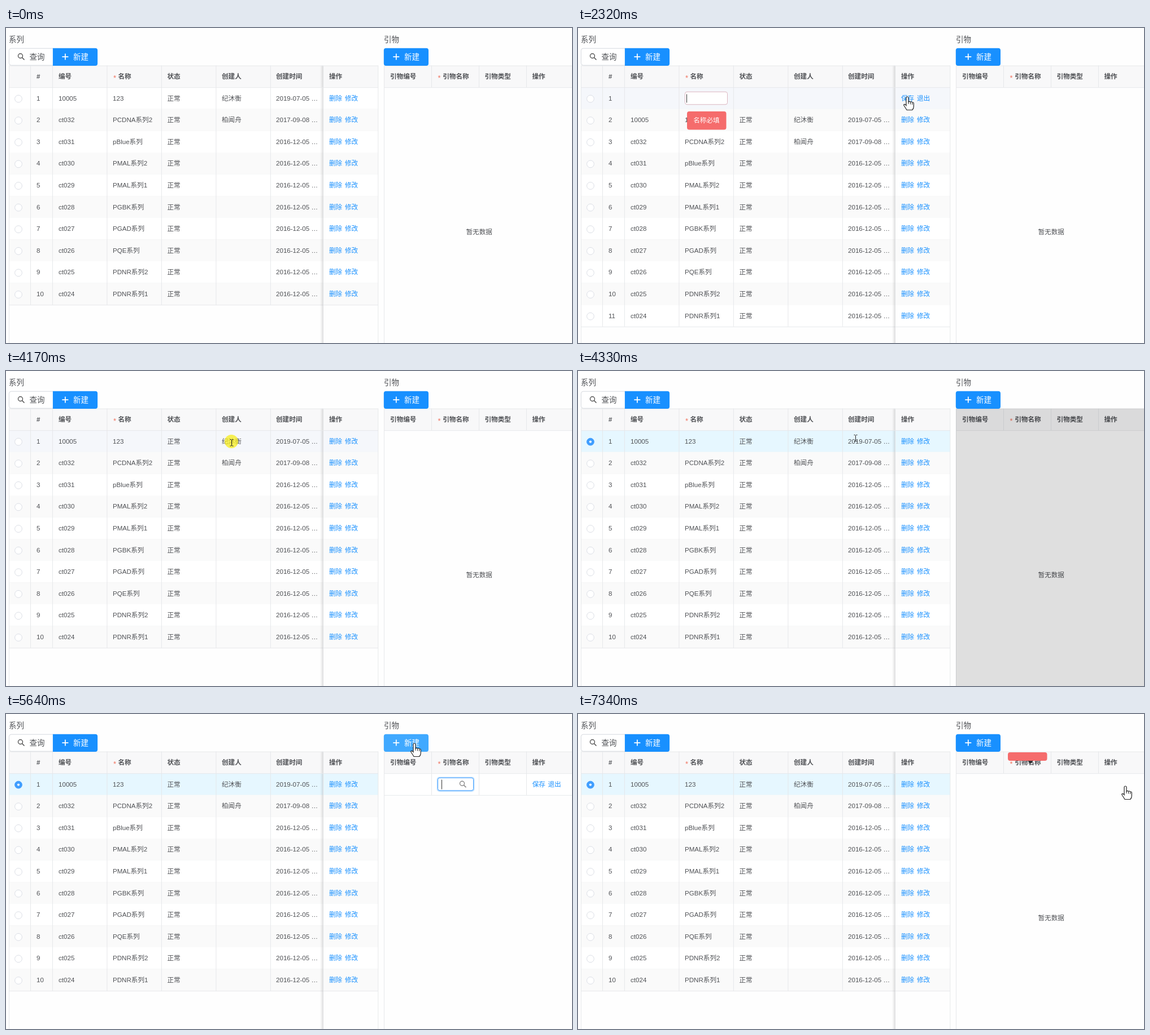
An HTML page that plays this animation: 1002 px wide and 559 px high, repeating every 8000 ms.

```html
<!DOCTYPE html>
<html lang="zh-CN">
<head>
<meta charset="utf-8">
<style>
html, body { margin: 0; width: 100%; height: 100%; overflow: hidden; background: #fefefe; }
svg { display: block; width: 1002px; height: 559px; }
text {
  font: 11.58px "Liberation Sans", "Noto Sans CJK SC", "Noto Sans CJK", sans-serif;
  fill: #505256; white-space: pre;
}
.big { font-size: 13.5px; }
.bold { font-weight: bold; }
.btn { font-weight: 500; fill: #fff; }
.link { fill: #1890ff; }
.star { fill: #f0705c; font-size: 13px; }
.tip { fill: #fff; }
</style>
</head>
<body>
<svg id="stage" viewBox="0 0 1002 559"></svg>
<script>
const LOOP = 8000, STEP = 77.4, ROW = 38.6, HEAD = 66.6, TOP = HEAD + ROW, THIN = .965;
const LINE = '#e6e8ea', BLUE = '#1890ff', RED = '#f56c6c';
const stage = document.getElementById('stage');

// id, name, creator, date
const DATA = [
  ['10005', '123', '纪沐衡', '2019-07-05'],
  ['ct032', 'PCDNA系列2', '柏闻舟', '2017-09-08'],
  ...['pBlue系列', 'PMAL系列2', 'PMAL系列1', 'PGBK系列', 'PGAD系列', 'PQE系列', 'PDNR系列2', 'PDNR系列1']
    .map((name, i) => ['ct0' + (31 - i), name, '', '2016-12-05'])
];

// moments of the story
const ADD_L = 843, FAIL_L = 2230, EXIT_L = 3390, PICK = 4240, LOADED = 4400;
const ADD_R = 5190, FAIL_R = 6360, EXIT_R = 7340;

// pointer way points: time, x, y
const PATH = [
  [140, 205, 150], [740, 135, 46], [1300, 135, 46], [1850, 617, 116], [2080, 583, 122],
  [2540, 583, 122], [2850, 628, 123], [3000, 628, 123], [3150, 613, 125], [3700, 613, 125],
  [4090, 399, 125], [4240, 399, 125], [4481, 712, 98], [4580, 738, 78], [4900, 723, 52],
  [5650, 723, 52], [6120, 943, 129], [6750, 943, 129], [7050, 969, 128], [8100, 969, 128]
];
const CLICKS = [[760, 840], [2150, 2230], [3310, 3390], [4160, 4240], [5030, 5130], [6280, 6360], [7260, 7340]];

const SHAPES = {
  hand: '<path d="M-2 2a2 2 0 0 1 4 0V9q2-1.5 3.5.3q2.3-1 3.2.8q2.6-.5 2.6 2V17q0 4-2.5 6.5H-1Q-3 20-6 15.5q-.8-1.8 1-2.2q1.5 0 3 2.2Z" fill="#fff" stroke="#222" stroke-width="1.2"/><path d="M2 9v4M5.5 10v3.5M8.7 11v3" stroke="#222" fill="none"/>',
  arrow: '<path d="M0 0V16l3.7-3.5 2.6 6 2.4-1-2.6-6H11Z" fill="#fff" stroke="#222"/>',
  beam: '<path d="M-2.5-3.5h2l1 1 1-1h2M.5-2.5V7M-2.5 8h2l1-1 1 1h2" fill="none" stroke="#222"/>'
};

const within = (v, a, b) => v >= a && v < b;
const rect = (x, y, w, h, fill, more = '') =>
  `<rect x="${x}" y="${y}" width="${w}" height="${h}" fill="${fill}" ${more}/>`;
const text = (x, y, s, cls = '') => `<text x="${x}" y="${y}" class="${cls}">${s}</text>`;
const path = (d, stroke, w = 1) => `<path d="${d}" fill="none" stroke="${stroke}" stroke-width="${w}"/>`;
const vline = (x, y1, y2) => path(`M${x} ${y1}V${y2}`, LINE, THIN);
const hline = (y, x1, x2) => rect(x1, y, x2 - x1, THIN, LINE);
const lens = (x, y, r, color) =>
  `<circle cx="${x}" cy="${y}" r="${r}" fill="none" stroke="${color}" stroke-width="1.4"/>` +
  path(`M${x + r * .7} ${y + r * .7}l4.2 4.2`, color, 1.6);

const blink = (t, since) => (t - since) % 1060 < 530;
const failColor = age => age < 150 ? '#dcb6c0' : RED;

function pointer(t) {
  if (t < 140) return null;
  const i = PATH.findIndex(p => p[0] > t);
  const [t0, x0, y0] = PATH[i - 1], [t1, x1, y1] = PATH[i];
  const k = (t - t0) / (t1 - t0), e = k * k * (3 - 2 * k);
  return { x: Math.round(x0 + (x1 - x0) * e), y: Math.round(y0 + (y1 - y0) * e) };
}

function links(x, y, a, b, gap = 28) {
  return text(x, y, a, 'link') + text(x + gap, y, b, 'link');
}

function addButton(x, left, hover, ring) {
  const w = 79.2, h = 23.2;
  const d = left
    ? `M${x} 35.7h${w - 4}q4 0 4 4v${h}q0 4-4 4h-${w - 4}Z`
    : `M${x + 4} 35.7h${w - 8}q4 0 4 4v${h}q0 4-4 4h-${w - 8}q-4 0-4-4v-${h}q0-4 4-4Z`;
  return (ring ? rect(x - 4, 31.7, w + 8, 39, 'rgba(24,144,255,.14)', 'rx="6"') : '') +
    `<path d="${d}" fill="${hover ? '#40a9ff' : BLUE}"/>` +
    path(`M${x + 16.5} 51.1h11M${x + 22} 45.6v11`, '#fff', 1.7) +
    text(x + 36.2, 56.3, '新建', 'big btn');
}

function field(x, w, color, ring, caret, caretX, caretH) {
  return (ring ? rect(x - 1.5, 111.5, w + 3, 26.5, 'rgba(24,144,255,.28)', 'rx="5"') : '') +
    rect(x + .5, 113.3, w - 1, 22.5, '#fff', `rx="3.5" stroke="${color}"`) +
    (caret ? path(`M${caretX} ${125 - caretH / 2}v${caretH}`, '#333') : '');
}

// the box shrinks to its padding once its message is gone
function tooltip(x, y, open) {
  return rect(x, y, 69.5, open ? 32.5 : 15, RED, 'rx="4"') +
    (open ? text(x + 11.3, y + 20.3, '名称必填', 'tip') : '');
}

function leftTable(t, cur) {
  const editing = within(t, ADD_L, EXIT_L), picked = t >= PICK;
  const rows = editing ? [null, ...DATA] : DATA;
  const hot = cur && within(cur.x, 5, 659) ? Math.floor((cur.y - TOP) / ROW) : -1;
  const end = TOP + rows.length * ROW, cols = [43.5, 82.4, 178.9, 275.4, 371.9, 468.4];
  let s = rect(5, HEAD, 654, ROW, '#f8f8f9');
  rows.forEach((r, i) => {
    const y = TOP + i * ROW, base = y + 23.4, mid = y + 20.4;
    const on = picked && i === 0;
    const bg = on ? '#e6f7ff' : i === hot ? '#f5f7fb' : i % 2 ? '#fafafa' : '#fff';
    s += rect(5, y, 654, ROW, bg) + hline(y + ROW, 5, 659);
    s += `<circle cx="22" cy="${mid}" r="6.4" fill="${on ? '#409eff' : '#fff'}" stroke="${on ? '#409eff' : '#dcdfe6'}"/>`;
    if (on) s += `<circle cx="22" cy="${mid}" r="2.1" fill="#fff"/>`;
    s += text(54, base, i + 1);
    if (r) s += text(93, base, r[0]) + text(189, base, r[1]) + text(285.5, base, '正常') +
      text(382, base, r[2]) + text(478, base, r[3] + ' …');
  });
  s += cols.map(x => vline(x, HEAD, end)).join('');
  s += rect(556, HEAD, 5.5, 493, 'url(#shade)') + path('M561.5 67V559', '#dfe0e2');
  rows.forEach((r, i) => {
    s += links(572, TOP + i * ROW + 23.4, ...(r ? ['删除', '修改'] : ['保存', '退出']));
  });
  s += hline(HEAD, 5, 659) + hline(TOP, 5, 659) + vline(5.5, HEAD, 559) + vline(658.8, HEAD, 559);
  [[54, '#'], [93, '编号'], [198.5, '名称'], [285.5, '状态'], [382, '创建人'], [478, '创建时间'], [572, '操作']]
    .forEach(([x, h]) => s += text(x, 89.8, h, 'bold'));
  s += text(190, 93, '*', 'star');
  if (editing) {
    const failed = t >= FAIL_L, since = failed ? FAIL_L : ADD_L;
    s += field(189, 76, failed ? failColor(t - since) : '#409eff', false, blink(t, since), 192.5, 15);
  }
  if (within(t, FAIL_L, 3620)) s += tooltip(193, 148, editing);
  return s;
}

function rightTable(t, cur) {
  const editing = within(t, ADD_R, EXIT_R);
  const end = editing ? TOP + ROW : TOP;
  let s = rect(669, HEAD, 333, ROW, '#f8f8f9');
  if (editing) {
    const hot = cur.x > 669 && within(cur.y, TOP, end);
    s += rect(669, TOP, 333, ROW, hot ? '#f5f7fb' : '#fff') + hline(end, 669, 1002);
  } else s += text(814.5, 365.8, '暂无数据');
  s += hline(HEAD, 669, 1002) + hline(TOP, 669, 1002) + vline(669.5, HEAD, 559);
  s += [753.5, 837.5, 921.5].map(x => vline(x, HEAD, end)).join('');
  [[680, '引物编号'], [773.3, '引物名称'], [847.5, '引物类型'], [931.5, '操作']]
    .forEach(([x, h]) => s += text(x, 89.8, h, 'bold'));
  s += text(764.5, 93, '*', 'star');
  if (editing) {
    const failed = t >= FAIL_R, since = failed ? FAIL_R : ADD_R;
    s += field(764, 64, failed ? failColor(t - since) : '#409eff', !failed, blink(t, since), 771.5, 17) +
      lens(807.5, 123.3, 4, '#888') + links(931.7, 128.6, '保存', '退出', 27.8);
  }
  if (t >= FAIL_R) {
    const y = editing ? 100.5 : 83;
    s += tooltip(761, 68, editing) + `<path d="M796 ${y}h10l-5 5.5Z" fill="#303133"/>`;
  }
  if (within(t, PICK, LOADED)) s += rect(669, HEAD, 333, 493, 'rgba(0,0,0,.12)');
  return s;
}

function drawPointer(t, cur) {
  const { x, y } = cur;
  const onButton = within(y, 36, 67) && (within(x, 5, 162) || within(x, 669, 748));
  const onLink = within(y, 113, 137) && (within(x, 570, 634) || (t > ADD_R && within(x, 930, 984)));
  const kind = onButton || onLink ? 'hand' : y > TOP && x < 561 ? 'beam' : 'arrow';
  const lit = CLICKS.some(([a, b]) => within(t, a, b));
  return (lit ? `<circle cx="${x}" cy="${y}" r="12" fill="#f5ec1c" opacity=".75"/>` : '') +
    `<g transform="translate(${x} ${y})">${SHAPES[kind]}</g>`;
}

function draw(t) {
  const cur = pointer(t);
  const over = x => cur && within(cur.x, x, x + 79) && within(cur.y, 36, 67);
  stage.innerHTML =
    '<defs><linearGradient id="shade"><stop offset="0" stop-color="#000" stop-opacity="0"/>' +
    '<stop offset="1" stop-color="#000" stop-opacity=".12"/></linearGradient></defs>' +
    rect(0, 0, 1002, 559, '#fefefe') +
    text(5, 25, '系列', 'big') + text(669, 25, '引物', 'big') +
    leftTable(t, cur) + rightTable(t, cur) +
    `<path d="M83 36.2H9.4q-4 0-4 4v22q0 4 4 4H83" fill="#fff" stroke="#d5d8de"/>` +
    lens(25.5, 49.5, 4, '#555') + text(41.5, 56.3, '查询', 'big') +
    addButton(82.9, true, over(83), within(t, 990, 1300)) +
    addButton(668.8, false, over(669), within(t, 5130, 5410)) +
    (cur ? drawPointer(t, cur) : '');
}

let shown = null;
function tick(now) {
  const t = now % LOOP;
  const q = 147 + Math.floor((t - 140) / STEP) * STEP;
  if (q !== shown) draw(shown = q);
  requestAnimationFrame(tick);
}
draw(0);
requestAnimationFrame(tick);
</script>
</body>
</html>
```
